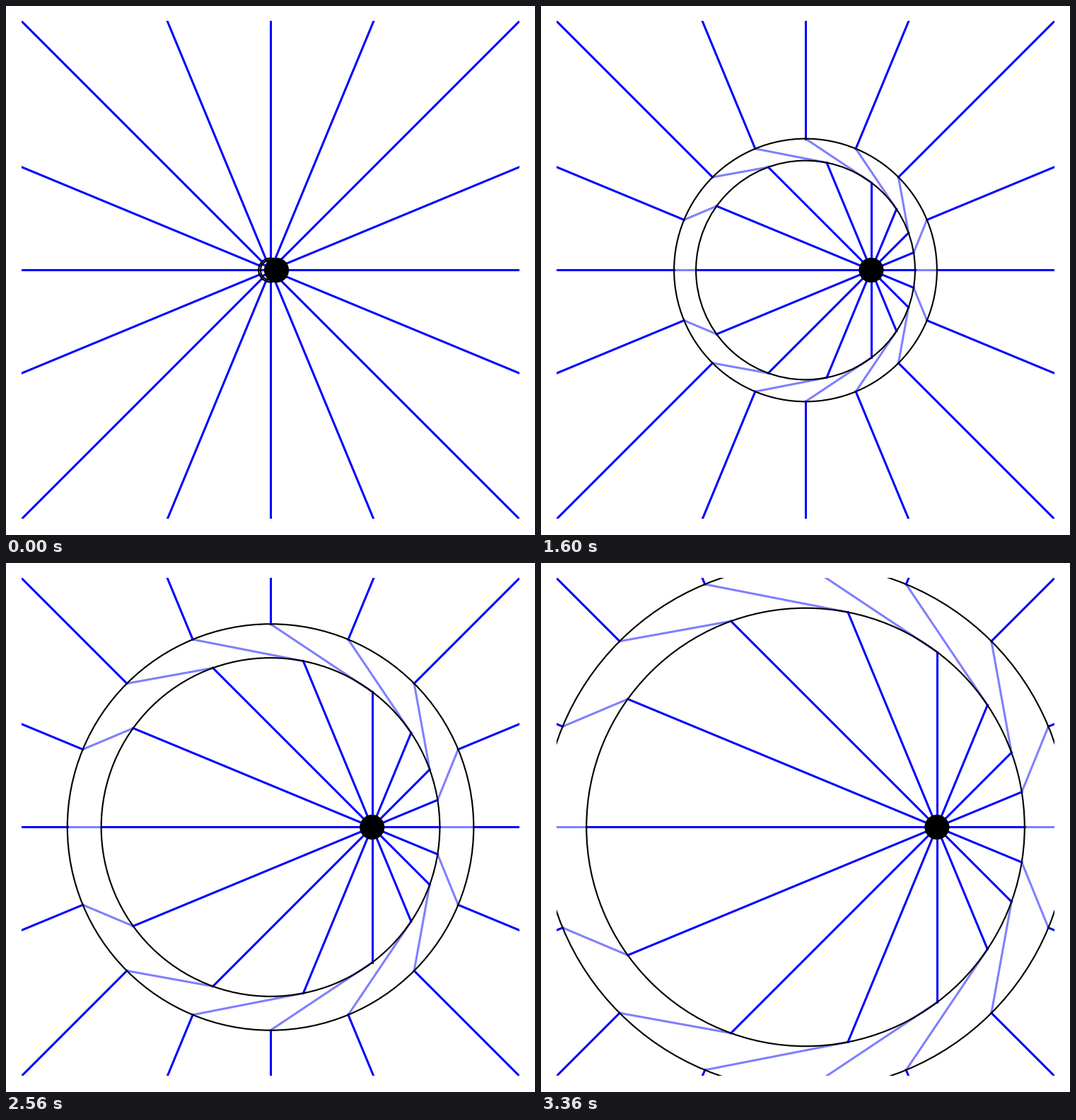
Recreate the animation shown at these times as a matplotlib script. Size 748 by 748 pixels, loop 3.44 s.

```python
import numpy as np
import matplotlib.pyplot as plt
from matplotlib.animation import FuncAnimation
from matplotlib.patches import Circle

SIZE, DPI = 748, 220
SPAN = 704            # side of the plot area in pixels
FRAMES, STEP = 43, 80
SPEED = 0.5           # charge speed relative to the outer wavefront
INNER = 1 / 1.2       # inner wavefront radius relative to the outer one
FAR = 2.0

fig = plt.figure(figsize=(SIZE / DPI, SIZE / DPI), dpi=DPI, facecolor="white")
ax = fig.add_axes([22.01 / SIZE, 22.51 / SIZE, SPAN / SIZE, SPAN / SIZE])
ax.set(xlim=(-1, 1), ylim=(-1, 1))
ax.axis("off")

angles = np.arange(16) * np.pi / 8
dirs = np.column_stack([np.cos(angles), np.sin(angles)]).round(12)


def make_rays(alpha=1.0):
    return [ax.plot([], [], color="blue", lw=1, alpha=alpha, zorder=2)[0]
            for _ in dirs]


def make_ring():
    ring = Circle((0, 0), 0.01, fill=False, ec="black", lw=0.7, zorder=3)
    return ax.add_patch(ring)


kinks = make_rays(0.5)
near_rays = make_rays()
far_rays = make_rays()
outer_ring, inner_ring = make_ring(), make_ring()
charge = ax.add_patch(Circle((0, 0), 0.05, fc="black", ec="none", zorder=4))


def set_segment(line, a, b):
    line.set_data([a[0], b[0]], [a[1], b[1]])


def update(i):
    outer = 0.024 * (i + 2)
    inner = INNER * outer
    x = SPEED * outer
    pos = np.array([x, 0.0])

    outer_ring.set_radius(outer)
    inner_ring.set_radius(inner)
    charge.center = (x, 0)

    for d, near, kink, far in zip(dirs, near_rays, kinks, far_rays):
        # distance from the charge to the inner wavefront along d
        reach = -x * d[0] + np.sqrt(inner**2 - (x * d[1])**2)
        hit = pos + reach * d
        set_segment(near, pos, hit)
        set_segment(kink, hit, outer * d)
        set_segment(far, outer * d, FAR * d)
    return []


anim = FuncAnimation(fig, update, frames=FRAMES, interval=STEP,
                     repeat=True, repeat_delay=0, blit=False)
plt.show()
```
